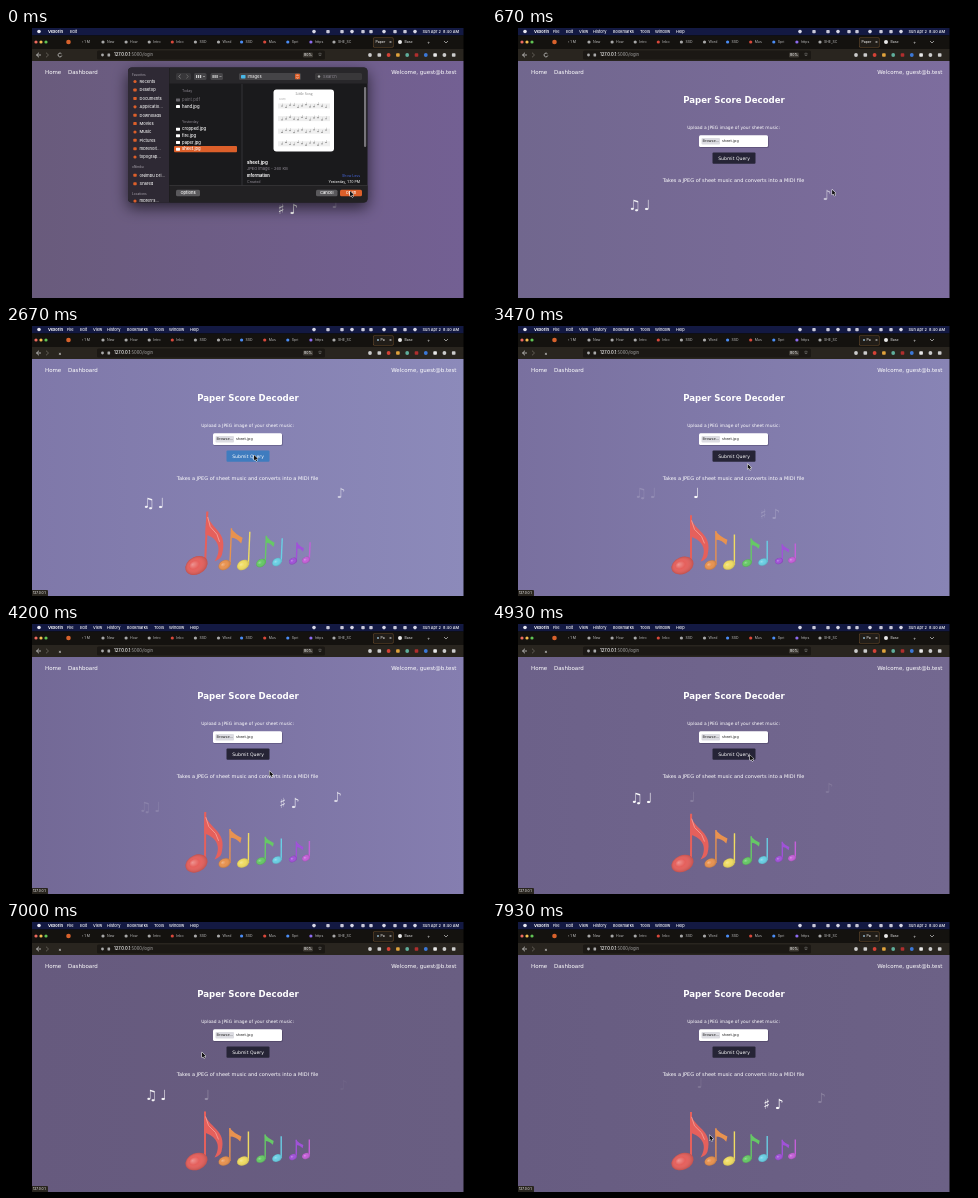
An HTML page with a canvas that plays this animation: 480x270 px, repeating every 8 s.

```html
<!DOCTYPE html>
<html lang="en">
<head>
<meta charset="utf-8">
<title>Paper Score Decoder</title>
<style>
html, body { margin: 0; width: 100%; height: 100%; overflow: hidden; background: #000; }
canvas { display: block; width: 100vw; height: 100vh; }
</style>
</head>
<body>
<canvas id="stage" width="480" height="270"></canvas>
<script>
const ctx = document.getElementById('stage').getContext('2d');
const LOOP = 8000, DIALOG_CLOSES = 470, SUBMITTED = 1900;
const LEFT = 26, WIDTH = 431.5;
const PAGE_FONT = '"DejaVu Sans", sans-serif', UI_FONT = 'Inter, sans-serif';
const ACCENT = '#dc5f2a';

// Interpolates rows of [time, ...values].
function track(t, keys, smooth = false) {
  let i = 0;
  while (i < keys.length - 2 && t >= keys[i + 1][0]) i++;
  const a = keys[i], b = keys[i + 1];
  let k = Math.min(1, Math.max(0, (t - a[0]) / (b[0] - a[0])));
  if (smooth) k = k * k * (3 - 2 * k);
  return a.slice(1).map((v, j) => v + (b[j + 1] - v) * k);
}
const rgb = v => `rgb(${v.map(Math.round).join(',')})`;

function box(x, y, w, h, color, radius = 0) {
  ctx.fillStyle = color;
  ctx.beginPath();
  ctx.roundRect(x, y, w, h, radius);
  ctx.fill();
}
function dot(x, y, r, color) {
  ctx.fillStyle = color;
  ctx.beginPath();
  ctx.arc(x, y, r, 0, 7);
  ctx.fill();
}
function text(s, x, y, size, { color = '#fff', weight = 400, align = 'left', font = UI_FONT } = {}) {
  ctx.font = `${weight} ${size}px ${font}`;
  ctx.fillStyle = color;
  ctx.textAlign = align;
  ctx.textBaseline = 'middle';
  ctx.fillText(s, x, y);
}
const pageText = (s, x, y, size, style) => text(s, x, y, size, { font: PAGE_FONT, ...style });
function line(points, color, width = 0.7) {
  ctx.strokeStyle = color;
  ctx.lineWidth = width;
  ctx.beginPath();
  points.forEach(p => ctx.lineTo(...p));
  ctx.stroke();
}

function menuBar(dialogOpen) {
  box(LEFT, 0, WIDTH, 7.5, '#131942');
  dot(33, 3.5, 1.8, '#e8e8f2');
  text('Vexorin', 42, 3.7, 4, { weight: 700 });
  const menus = dialogOpen ? [['Edit', 64]] : [['File', 61], ['Edit', 74], ['View', 87], ['History', 101],
    ['Bookmarks', 121], ['Tools', 148], ['Window', 163], ['Help', 184]];
  menus.forEach(([s, x]) => text(s, x, 3.7, 3.9, { weight: 500 }));
  [308, 322, 336, 346, 357, 365, 378, 389, 399, 409].forEach((x, i) =>
    i % 3 ? box(x - 1.7, 2, 3.4, 3.2, '#c8c8d8', 0.8) : dot(x, 3.6, 1.8, '#d8d8e6'));
  text('Sun Apr 2  8:40 AM', 453, 3.7, 3.9, { align: 'right', weight: 500 });
}

function tabBar(loading) {
  box(LEFT, 7.5, WIDTH, 13.5, '#14120f');
  ['#ee6a5f', '#f5bd4f', '#61c454'].forEach((c, i) => dot(30 + i * 5, 14, 1.6, c));
  dot(62.5, 14, 2.3, '#d8622c');
  text('‹ 1 M', 76, 14.2, 3.5, { color: '#c8c8c8' });
  const tabs = ['New', 'How', 'Intro', 'Inbo', 'SSD', 'Word', 'SSD', 'Mus', 'Spri', 'https', 'SHE_SC'];
  const iconColors = { 3: '#d9483b', 6: '#4b8df5', 7: '#d9483b', 8: '#4b8df5', 9: '#8d6cf0' };
  tabs.forEach((s, i) => {
    const x = 97 + i * 23.1;
    dot(x, 14, 1.6, iconColors[i] || '#a9a9a9');
    text(s, x + 4, 14.2, 3.5, { color: '#b8b8b8' });
  });
  box(367, 9.5, 20.5, 10, '#6b4c2c', 1.2);
  box(367.5, 10, 19.5, 9, '#211d18', 1);
  if (loading) dot(372, 14, 1, '#8fb0c4');
  text(loading ? 'Pa' : 'Paper', loading ? 374.5 : 369.5, 14.2, 3.5);
  text('×', 383, 14, 4.5);
  dot(394, 14, 2, '#e8e8e8');
  text('Base', 398.5, 14.2, 3.5, { color: '#ddd' });
  text('+', 421, 14, 5, { color: '#ccc' });
  line([[438, 13], [440, 15], [442, 13]], '#ccc');
}

function addressBar(loading) {
  box(LEFT, 21, WIDTH, 12, '#29251f');
  line([[33, 24.7], [30.5, 27], [33, 29.3]], '#ddd');
  line([[30.5, 27], [35, 27]], '#ddd');
  line([[40, 24.7], [42.5, 27], [40, 29.3]], '#77736c');
  if (loading) text('×', 54, 27, 5, { align: 'center' });
  else {
    ctx.strokeStyle = '#ddd';
    ctx.lineWidth = 0.7;
    ctx.beginPath();
    ctx.arc(54, 27, 1.9, 0.3, 5.6);
    ctx.stroke();
  }
  box(91, 22.5, 228, 9, '#1b1814', 1.5);
  dot(96.5, 27, 1.4, '#aaa');
  box(101.5, 25.5, 2.6, 3, '#aaa', 0.4);
  text('127.0.0.1', 108, 27.2, 4.2, { weight: 500 });
  text(':5000/login', 108 + ctx.measureText('127.0.0.1').width, 27.2, 4.2, { color: '#aaa' });
  box(297, 24.5, 10, 5, '#3d3933', 1.2);
  text('80%', 302, 27.1, 3.5, { align: 'center' });
  pageText('☆', 314, 27, 5, { align: 'center' });
  ['#ccc', '#ccc', '#d54236', '#e0a33c', '#5fae9c', '#b02e2e', '#3b78d8', '#e8e8e8', '#ccc', '#ccc']
    .forEach((c, i) => i % 2 ? box(371.5 + (i - 1) * 9.3, 25.2, 3.6, 3.6, c, 0.8) : dot(364 + i * 9.3, 27, 1.9, c));
}

function background(t) {
  // Left and right edge colours.
  const v = track(t, [
    [0, 105, 91, 124, 115, 96, 147],
    [1600, 124, 120, 168, 138, 127, 174],
    [2670, 127, 120, 169, 140, 138, 186],
    [4200, 115, 105, 150, 133, 126, 176],
    [4930, 108, 97, 137, 115, 104, 144],
    [6130, 101, 89, 124, 103, 92, 127],
    [7930, 103, 92, 129, 108, 97, 134]]);
  const g = ctx.createLinearGradient(LEFT, 0, LEFT + WIDTH, 0);
  g.addColorStop(0, rgb(v.slice(0, 3)));
  g.addColorStop(1, rgb(v.slice(3)));
  box(LEFT, 33, WIDTH, 237, g);
}

function navigation() {
  pageText('Home', 39, 44.6, 5.5);
  pageText('Dashboard', 62, 44.6, 5.5);
  pageText('Welcome, guest@b.test', 450.5, 44.6, 5.5, { align: 'right' });
}

function pageContent(t) {
  const centre = { align: 'center' };
  pageText('Paper Score Decoder', 242, 73.1, 8.6, { ...centre, weight: 700 });
  pageText('Upload a JPEG image of your sheet music:', 241.5, 99.6, 4.42, centre);
  box(207, 108, 70, 12, 'rgba(30,20,50,.25)', 2);
  box(207, 107.3, 69, 11.7, '#fff', 1.5);
  box(209.5, 110, 18.5, 6.6, '#dcdce2', 1);
  pageText('Browse...', 218.8, 113.5, 3.6, { ...centre, color: '#222' });
  pageText('sheet.jpg', 230, 113.5, 3.6, { color: '#222' });
  const [hover] = track(t, [[1600, 0], [1900, 1], [3000, 1], [3300, 0], [4930, 0], [5200, 1], [5960, 1], [6300, 0]]);
  box(220.5, 124.4, 43, 11.4, rgb(track(hover, [[0, 38, 36, 54], [1, 63, 124, 191]])), 1);
  pageText('Submit Query', 242, 130.4, 4.6, centre);
  pageText('Takes a JPEG of sheet music and converts into a MIDI file', 241.5, 152.8, 5.01, centre);
}

// Glyphs drift up and to the right, fading in and out every two seconds.
function floatingNotes(t) {
  [['♫♩', 137.5, 186.4, 0, 1700, 1], ['♩', 199, 177, 750, 1350, 1],
   ['♯♪', 269.6, 191.8, -750, 1450, 1], ['♪', 327.8, 180.3, -300, 1400, 0.85]]
    .forEach(([glyphs, x, y, start, life, strength]) => {
      const age = (t - start + 4000) % 2000;
      if (age > life) return;
      ctx.globalAlpha = strength * Math.sin(Math.PI * age / life) ** 2;
      [...glyphs].forEach((g, i) =>
        pageText(g, x + i * 12.5 + age * 0.0075, y - age * 0.0122, 14, { align: 'center' }));
      ctx.globalAlpha = 1;
    });
}

function noteHead(r, color) {
  ctx.save();
  ctx.rotate(-0.4);
  ctx.scale(1, 0.72);
  const g = ctx.createRadialGradient(-r * 0.3, -r * 0.3, 0, 0, 0, r);
  g.addColorStop(0, '#ffffff55');
  g.addColorStop(0.45, '#ffffff00');
  g.addColorStop(1, '#00000028');
  dot(0, 0, r, color);
  dot(0, 0, r, g);
  ctx.restore();
}
function dance(x, y, lean, stretch, draw) {
  ctx.save();
  ctx.translate(x, y);
  ctx.transform(1, 0, -lean, stretch, 0, 0);
  draw();
  ctx.restore();
}
function bigNote(color) {
  line([[8.5, -1], [8.5, -50]], color, 2);
  ctx.fillStyle = color;
  ctx.beginPath();
  ctx.moveTo(7.5, -50);
  ctx.bezierCurveTo(11, -33, 31, -33, 25, -10);
  ctx.quadraticCurveTo(24, -6, 18, -4);
  ctx.bezierCurveTo(25, -15, 21, -25, 7.5, -29);
  ctx.fill();
  line([[9, -45], [12, -36], [19, -29], [22, -22]], '#f7a59c', 0.8);
  noteHead(11.5, color);
}
function smallNote(r, height, color, flag) {
  const stem = r - 0.8;
  line([[stem, 0], [stem, -height]], color, 1.4);
  if (flag) {
    ctx.fillStyle = color;
    ctx.beginPath();
    ctx.moveTo(stem - 0.6, -height);
    ctx.quadraticCurveTo(stem + flag * 0.4, -height + flag * 0.5, stem + flag, -height + flag * 0.75);
    ctx.lineTo(stem + flag * 0.9, -height + flag * 1.2);
    ctx.quadraticCurveTo(stem + flag * 0.5, -height + flag * 0.75, stem, -height + flag * 0.75);
    ctx.fill();
  }
  noteHead(r, color);
}
function colouredNotes(t) {
  const pulse = Math.max(0, Math.cos((t - 550) * Math.PI / 1000)) ** 3;
  const lean = 0.06 * pulse;
  const stretch = i => 1 + 0.12 * pulse + 0.02 * Math.sin(t * Math.PI / 500 - i);
  dance(190.5, 239.5, lean, stretch(0), () => bigNote('#e5605c'));
  [[218.5, 239, 6.2, 33.5, '#e8924f', 11.5], [237, 239, 6.2, 30, '#f0dc62', 0],
   [255, 237, 5, 24.5, '#66c866', 8.5], [271, 236, 5, 21.5, '#69cfe4', 0],
   [287, 235, 4.1, 17, '#a052d8', 7], [300, 234, 4.1, 16.5, '#c460d8', 0]]
    .forEach(([x, y, r, height, color, flag], i) =>
      dance(x, y, lean, stretch(i + 1), () => smallNote(r, height, color, flag)));
}

function sheetPreview() {
  box(267.5, 61.5, 60.5, 62, '#fff', 3);
  text('Little Song', 298, 66, 3.4, { color: '#888', align: 'center', font: '"Noto Serif", serif' });
  text('Slowly', 273, 71, 2.2, { color: '#aaa' });
  for (let staff = 0; staff < 4; staff++) {
    const y = 76 + staff * 12.6;
    for (let i = 0; i < 5; i++) line([[272, y + i], [324, y + i]], '#bbb', 0.25);
    for (let i = 0; i < 12; i++) {
      const x = 276 + i * 4, dy = 2 + 1.4 * Math.sin(i * 1.9 + staff);
      dot(x, y + dy, 0.6, '#555');
      line([[x + 0.5, y + dy], [x + 0.5, y + dy - 2.4]], '#888', 0.3);
    }
  }
}

function fileDialog() {
  ctx.save();
  ctx.shadowColor = 'rgba(0,0,0,.65)';
  ctx.shadowBlur = 15;
  ctx.shadowOffsetY = 5;
  box(122, 39.5, 239.5, 135, '#1a1a1c', 4);
  ctx.restore();
  box(122, 39.5, 41, 135, '#2e2934', [4, 0, 0, 4]);
  const dim = { color: '#8f8a94' }, bold = { weight: 700 }, right = { align: 'right' };
  [['Favorites', 47], ['oNimbu', 139], ['Locations', 166]]
    .forEach(([s, y]) => text(s, 126, y, 3.1, { ...dim, weight: 600 }));
  [['Recents', 53.5], ['Desktop', 62], ['Documents', 70.4], ['Applicatio...', 78.8], ['Downloads', 87.2],
   ['Movies', 95.6], ['Music', 104], ['Pictures', 112.3], ['mbrenolt...', 120.7], ['topograp...', 129],
   ['oNimbu Dri...', 147.3], ['Shared', 155.8], ["mbren's...", 173]]
    .forEach(([s, y], i) => {
      if (i % 3) box(127.3, y - 1.5, 3.4, 3, ACCENT, 0.7);
      else dot(129, y, 1.6, ACCENT);
      text(s, 133.5, y + 0.2, 4.1, { color: '#eee', weight: 500 });
    });

  box(163.5, 39.5, 198, 16, '#28272a', [0, 4, 0, 0]);
  box(170, 45, 15, 7, '#38373a', 1.5);
  line([[174.5, 46.5], [172.8, 48.5], [174.5, 50.5]], '#999');
  line([[180.5, 46.5], [182.2, 48.5], [180.5, 50.5]], '#777');
  [188, 204.5].forEach(x => {
    box(x, 45, 12.5, 7, '#454447', 1.5);
    for (let i = 0; i < 3; i++) box(x + 2 + i * 2, 47, 1.2, 3, '#ccc');
    line([[x + 9, 48], [x + 10, 49], [x + 11, 48]], '#ddd', 0.5);
  });
  box(233, 45, 62, 7, '#454447', 1.5);
  box(235, 47, 4.5, 3.4, '#48b9ea', 0.6);
  text('Images', 241.5, 48.8, 4.1);
  box(289, 45.8, 5, 5.4, ACCENT, 1);
  line([[290.5, 48], [291.5, 46.8], [292.5, 48]], '#fff', 0.5);
  line([[290.5, 49.2], [291.5, 50.4], [292.5, 49.2]], '#fff', 0.5);
  box(309, 45, 47, 7, '#39383a', 1.5);
  dot(313, 48.5, 1.2, '#aaa');
  text('Search', 317, 48.8, 4.1, dim);

  box(168, 118, 63, 6.2, ACCENT, 1);
  text('Today', 176, 63, 3.5, dim);
  text('Yesterday', 176, 94, 3.5, dim);
  [['paint.pdf', 71.9, '#69666c'], ['hand.jpg', 78.5], ['cropped.jpg', 101.2], ['fire.jpg', 107.7],
   ['paper.jpg', 114.4], ['sheet.jpg', 121.2]]
    .forEach(([s, y, color = '#fff']) => {
      box(170, y - 1.5, 4, 3, color, 0.4);
      text(s, 176, y, 4.2, { color, weight: 500 });
    });
  line([[236, 56], [236, 158]], '#403f42', 0.7);
  sheetPreview();
  box(358, 59, 2.2, 60, '#77757a', 1);
  text('sheet.jpg', 241, 134.2, 4.5, bold);
  text('JPEG image - 260 KB', 241, 140.4, 4, dim);
  text('Information', 241, 147.5, 4, bold);
  text('Show Less', 354, 147.5, 3.5, { ...right, color: '#4665d8' });
  text('Created', 241, 154.4, 3.6, dim);
  text('Yesterday, 1:10 PM', 354, 154.4, 3.6, right);
  box(163.5, 157.5, 198, 17, '#222123', [0, 0, 4, 0]);
  line([[163.5, 157.5], [361.5, 157.5]], '#403f42', 0.6);
  [['Options', 170, 24], ['Cancel', 310, 21.5], ['Open', 334, 22]].forEach(([s, x, w]) => {
    box(x, 161.7, w, 6.6, s === 'Open' ? ACCENT : '#5a595c', 1.5);
    text(s, x + w / 2, 165.2, 4.1, { align: 'center', weight: 500 });
  });
}

function cursor(t) {
  const [x, y] = track(t, [[0, 344, 163], [550, 344, 163], [1550, 248, 129], [2850, 248, 129],
    [4100, 263.5, 147], [4500, 263.5, 147], [4930, 258, 131], [5250, 250, 130], [5800, 240, 128],
    [6130, 187, 95.5], [6500, 187, 96], [7900, 217.5, 213], [8000, 217.5, 213]], true);
  ctx.beginPath();
  [[0, 0], [0, 5.2], [1.3, 4.2], [2.2, 6.2], [3.1, 5.8], [2.2, 3.9], [3.9, 3.8]]
    .forEach(([dx, dy]) => ctx.lineTo(x + dx, y + dy));
  ctx.closePath();
  ctx.lineWidth = 1;
  ctx.strokeStyle = '#fff';
  ctx.stroke();
  ctx.fillStyle = '#111';
  ctx.fill();
}

function draw(now) {
  const t = now % LOOP, loading = t >= SUBMITTED, dialogOpen = t < DIALOG_CLOSES;
  ctx.fillStyle = '#000';
  ctx.fillRect(0, 0, 480, 270);
  background(t);
  floatingNotes(t);
  navigation();
  if (dialogOpen) fileDialog();
  else pageContent(t);
  if (loading) {
    colouredNotes(t);
    box(LEFT, 264, 16, 6, '#29251f', [0, 1, 0, 0]);
    text('127.0.0.1', 27, 267.3, 3.3);
  }
  menuBar(dialogOpen);
  tabBar(loading);
  addressBar(loading);
  cursor(t);
  requestAnimationFrame(() => draw(performance.now()));
}
draw(0);
</script>
</body>
</html>
```
